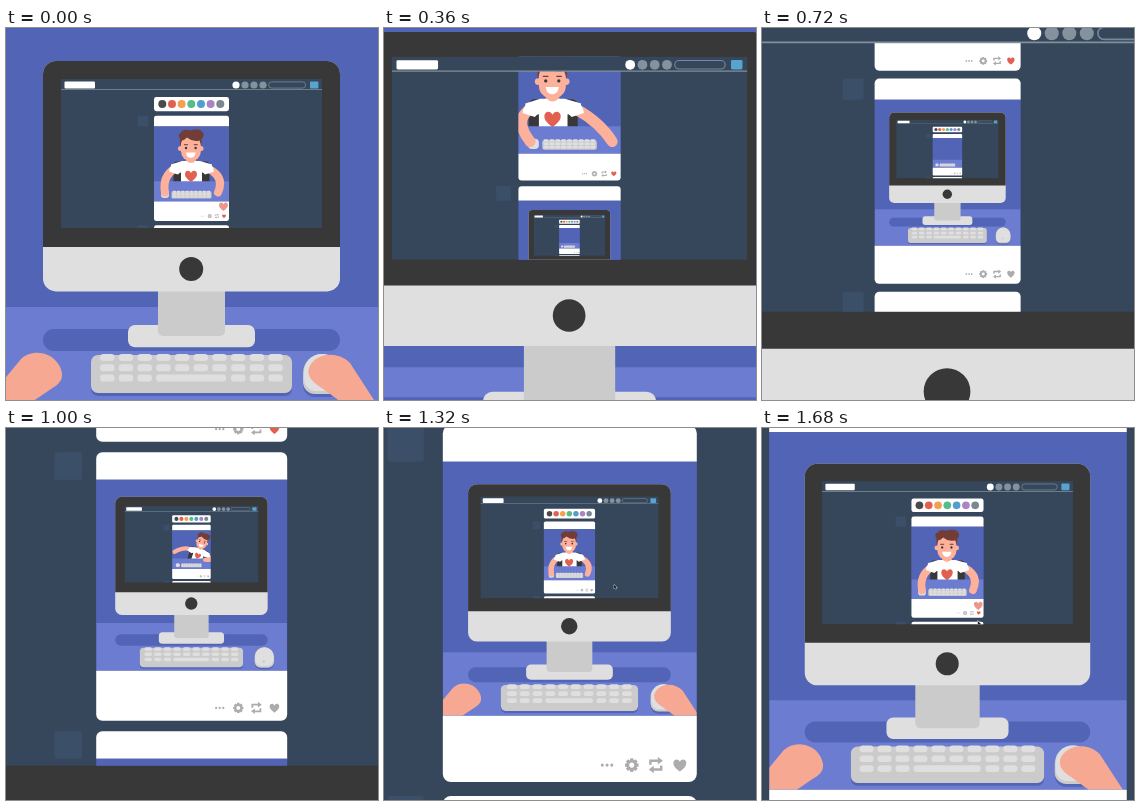
Recreate the animation shown at these times as an HTML page with a canvas. Size 372 by 372 pixels, loop 1720 ms.

```html
<!DOCTYPE html>
<html lang="en">
<head>
<meta charset="utf-8">
<title>Endless feed</title>
<style>
  html, body { margin: 0; height: 100%; overflow: hidden; background: #5264b6; }
  canvas { display: block; width: 100vw; height: 100vh; }
</style>
</head>
<body>
<canvas id="stage" width="372" height="372"></canvas>
<script>
const ctx = document.getElementById('stage').getContext('2d');
const LOOP = 1720, STEP = 40, SIZE = 372;
const CARD_X = 148, CARD_W = 75, PIC_Y = 10.8, CARD_H = 105.4, PITCH = 109.5;
const FEED_TOP = 87.7, SCROLL = 120.3;
const NEST = CARD_W / SIZE;
const FOCUS_X = CARD_X / (1 - NEST);
const FOCUS_Y = (FEED_TOP + PITCH + PIC_Y - SCROLL) / (1 - NEST);
const WALL = '#5264b6', DESK = '#6b7cd1', PAGE = '#36475c', DARK = '#383838';
const LIGHT = '#dfdfdf', MID = '#cbcbcb', SKIN = '#f6a892', FACE = '#fdb19b';
const RED = '#e2604f', GREY = '#acacac', HAIR = '#713d36';
const PALETTE = ['#4a4a4a', '#e2604f', '#f5a04e', '#56bc8a', '#529ecc', '#a985c4', '#7b8791'];

const clamp = v => Math.max(0, Math.min(1, v));
const smooth = v => { v = clamp(v); return v * v * (3 - 2 * v); };
const mix = (a, b, v) => a + (b - a) * v;

function box(x, y, w, h, color, r = 0) {
  ctx.fillStyle = color;
  ctx.beginPath();
  ctx.roundRect(x, y, w, h, r);
  ctx.fill();
}

function dot(x, y, r, color) {
  ctx.fillStyle = color;
  ctx.beginPath();
  ctx.arc(x, y, r, 0, 7);
  ctx.fill();
}

function shape(d, color) {
  ctx.fillStyle = color;
  ctx.fill(new Path2D(d));
}

function line(d, color, width, cap = 'round') {
  ctx.strokeStyle = color;
  ctx.lineWidth = width;
  ctx.lineCap = cap;
  ctx.stroke(new Path2D(d));
}

function at(x, y, scale, draw) {
  ctx.save();
  ctx.translate(x, y);
  ctx.scale(scale, scale);
  draw();
  ctx.restore();
}

function clipped(x, y, w, h, draw) {
  ctx.save();
  ctx.beginPath();
  ctx.rect(x, y, w, h);
  ctx.clip();
  draw();
  ctx.restore();
}

function heart(x, y, w, color) {
  at(x, y, w / 10, () =>
    shape('M0 5C-3 2.5-5 1-5-1.7C-5-5-1.2-5.4 0-2.6C1.2-5.4 5-5 5-1.7C5 1 3 2.5 0 5Z', color));
}

function keyboard() {
  box(85, 329, 201, 39, WALL, 7);
  box(85, 327, 201, 38, MID, 7);
  for (let row = 0; row < 3; row++) {
    for (let col = 0; col < 10; col++) {
      const space = row === 2 && col > 2 && col < 7;
      if (space && col > 3) continue;
      box(94 + col * 18.7, 326 + row * 10.3, space ? 70 : 14.6, 7, LIGHT, 3.4);
    }
  }
}

function mouse(x) {
  box(x, 329, 38, 40, WALL, [17, 17, 12, 12]);
  box(x, 326, 38, 40, MID, [19, 19, 12, 12]);
  box(x + 1, 326, 36, 37, LIGHT, [18, 18, 12, 12]);
  dot(x + 18, 354, 2.5, MID);
}

// The desk worker, in picture units of 75 x 75
function worker(u) {
  const enter = u < 1150 ? (1150 - u) ** 2 * .00049 : 0;
  const leave = u > 1900 ? (u - 1900) ** 2 * .00037 : 0;
  const dx = enter - leave;
  const tilt = Math.min(enter * .028, .6);
  const cos = Math.cos(tilt), sin = Math.sin(tilt);
  const body = draw => {
    ctx.save();
    ctx.translate(37 + dx, 55);
    ctx.rotate(tilt);
    ctx.translate(-37, -55);
    draw();
    ctx.restore();
  };
  const joint = (x, y) => [37 + dx + (x - 37) * cos - (y - 55) * sin, 55 + (x - 37) * sin + (y - 55) * cos];
  const arm = (shoulder, elbow, hand) => line(`M${shoulder}Q${elbow} ${hand}`, FACE, 8);

  box(0, 0, 75, 75, WALL);
  body(() => {
    box(19.5, 35, 36, 30, DARK, 4);
    box(32, 28, 10, 10, '#f19a86');
    shape('M28 34.5H46L58 38L57 47L48 46V62H27V46L18 47L17 38Z', '#fff');
    shape('M32 34H42Q37 39 32 34Z', FACE);
    heart(37, 49.5, 12, RED);
  });
  box(0, 54.7, 75, 21, DESK);
  box(17.5, 65, 40, 7, MID, 1.5);
  for (let row = 0; row < 3; row++)
    for (let col = 0; col < 9; col++)
      box(18.4 + col * 4.3, 64.3 + row * 2.4, 3.7, 1.9, LIGHT, .9);
  box(7, 64, 8, 7.5, LIGHT, 3);
  if (Math.abs(dx) > 80) return;
  const leftHand = [11 + Math.max(0, enter - 11) - enter * .6 - leave * .2, 66 - Math.min(enter, 14) * 2.2];
  const rightHand = [64 + Math.max(0, enter - 11) + leave * .4, 66 - enter * .8];
  arm(joint(21, 42), joint(8, 50 - Math.min(enter, 14)), leftHand);
  arm(joint(54, 42), leave ? [mix(71, 60, clamp(leave / 12)), 52] : joint(71, 50), rightHand);
  body(() => {
    shape('M27 36L18 38Q15 42 15 45L24 48L29 43Z', '#fff');
    shape('M47 36L57 38Q60 42 60 45L51 48L46 43Z', '#fff');
    dot(26.5, 22, 2.5, FACE);
    dot(47, 22, 2.5, FACE);
    box(27, 9, 19.8, 25.5, FACE, [6, 6, 9.5, 9.5]);
    shape('M26 20V12Q23 8 27 6Q29 2 36 4Q43 2 47 4Q52 8 47.5 13V20L45.5 14Q39 16 33 11Q30 14 28 14Z', HAIR);
    dot(32, 21.5, 1.2, DARK);
    dot(41.6, 21.5, 1.2, DARK);
    line('M30.3 18.2H33.6M40.2 18.2H43.4', HAIR, 1);
    shape('M32 26H41.6Q41 31.3 36.8 31.3Q32.5 31.3 32 26Z', '#fff');
  });
}

function actions(y, liked) {
  for (let i = -1; i < 2; i++) dot(196.5 + i * 1.4, y, .45, GREY);
  at(203.8, y, 1, () => {
    for (let i = 0; i < 4; i++) {
      box(-.5, -2, 1, 4, GREY);
      ctx.rotate(Math.PI / 4);
    }
    dot(0, 0, 1.6, GREY);
    dot(0, 0, .75, '#fff');
  });
  at(210.9, y, 1, () => {
    line('M-1.6-.1V-1.3H.8M1.6 .1V1.3H-.8', GREY, .7, 'butt');
    shape('M.6-2.4L2.1-1.3L.6-.2ZM-.6 2.4L-2.1 1.3L-.6 .2Z', GREY);
  });
  heart(218, y, 3.8, liked ? RED : GREY);
}

function post(index, top, u, nested) {
  const pic = top + PIC_Y, foot = pic + CARD_W;
  box(131.6, top, 10.8, 10.8, '#3c4f69', 1);
  box(CARD_X, top, CARD_W, PIC_Y, '#fff', [2.4, 2.4, 0, 0]);
  box(CARD_X, pic, CARD_W, CARD_W, WALL);
  clipped(CARD_X, pic, CARD_W, CARD_W, () => {
    if (index === 0) at(CARD_X, pic, 1, () => worker(u));
    if (index === 1 && nested) at(CARD_X, pic, NEST, () => scene(u - LOOP, false));
  });
  box(CARD_X, foot, CARD_W, top + CARD_H - foot, '#fff', [0, 0, 2.4, 2.4]);
  actions(top + 100.4, index === 0 && u >= 1560);
}

function header() {
  box(55, 51, 261, 10.6, PAGE);
  box(55, 61.2, 261, .9, '#7f9199');
  box(58.5, 53.6, 30.5, 6.8, '#fff', 1);
  for (let i = 0; i < 4; i++) dot(230 + i * 9, 57, 3.6, i ? '#84929d' : '#fff');
  ctx.strokeStyle = '#75899a';
  ctx.lineWidth = .8;
  ctx.beginPath();
  ctx.roundRect(262.7, 53.9, 37, 6.2, 3.1);
  ctx.stroke();
  box(304, 53.4, 8.4, 7, '#57a5cf', 1);
}

function cursor(u) {
  if (u < 1200 || u >= LOOP) return;
  const go = smooth((u - 1240) / 300);
  const out = clamp((u - 1580) / 140);
  at(mix(258, 217, go), mix(179, 188, go) + out * 12, 1, () => {
    const arrow = 'M0 0V5.5L1.4 4.2L2.4 6.3L3.4 5.8L2.4 3.8H4.2Z';
    line(arrow, '#fff', .8);
    shape(arrow, '#222');
  });
}

function screen(u, nested) {
  box(55, 51, 261, 149, PAGE);
  const scroll = SCROLL * smooth((u - LOOP) / 800);
  box(CARD_X, 69 - scroll, CARD_W, 14.2, '#fff', 2.4);
  PALETTE.forEach((color, i) => dot(156.3 + i * 9.67, 76.1 - scroll, 4, color));
  for (let i = 0; i < 3; i++) post(i, FEED_TOP - scroll + i * PITCH, u, nested);
  const rise = (u - 1560) / 300;
  if (rise > 0 && rise < 1) {
    ctx.globalAlpha = .65 * clamp(2.2 - 2 * rise);
    heart(217.5, 187 - rise * 16 - scroll, 4 + 5 * clamp(rise * 3), RED);
    ctx.globalAlpha = 1;
  }
  header();
  cursor(u);
}

function hands(u, mouseX) {
  const away = 95 * (1 - smooth((u - 1020) / 240));
  if (away > 90) return;
  const leave = clamp((u - 1800) / 240);
  at(-away - leave * 15, away, 1, () =>
    shape('M-60 425L-4 354L15 331C25 321 45 323 53 337C60 350 54 356 45 361L20 378L-40 430Z', SKIN));
  at(mouseX - 297 + away, away, 1, () =>
    shape('M305 336C314 324 333 324 344 335L368 372L410 430H390L331 371L310 356C301 349 301 342 305 336Z', SKIN));
}

function scene(u, nested) {
  clipped(0, 0, SIZE, SIZE, () => {
    box(0, 0, SIZE, SIZE, WALL);
    box(0, 279, SIZE, 93, DESK);
    box(37, 301, 297, 22, WALL, 11);
    box(122, 297, 127, 22.3, LIGHT, 7);
    box(152, 255, 67, 53, MID, 5);
    box(37, 33, 297, 230.4, LIGHT, 13);
    box(37, 33, 297, 186, DARK, [13, 13, 0, 0]);
    dot(185.2, 241, 12, DARK);
    clipped(55, 51, 261, 149, () => screen(u, nested));
    keyboard();
    const push = smooth((u - 1220) / 240) - smooth((u - 1800) / 240);
    const mouseX = 308.5 - 11.5 * push;
    mouse(mouseX);
    hands(u, mouseX);
  });
}

function frame(now) {
  const t = Math.floor(now % LOOP / STEP) * STEP;
  const phase = Math.PI * t / LOOP;
  // A steady exponential zoom with a slight uneven pull
  const lag = .01 * Math.sin(phase) + .008 * Math.sin(2 * phase) + .013 * Math.sin(3 * phase);
  const zoom = Math.exp(-Math.log(NEST) * t / LOOP - lag);
  const lift = 1.7 * Math.sin(phase);
  ctx.setTransform(zoom, 0, 0, zoom, FOCUS_X * (1 - zoom), FOCUS_Y * (1 - zoom) - lift);
  scene(t + LOOP, true);
  requestAnimationFrame(frame);
}
requestAnimationFrame(frame);
</script>
</body>
</html>
```
